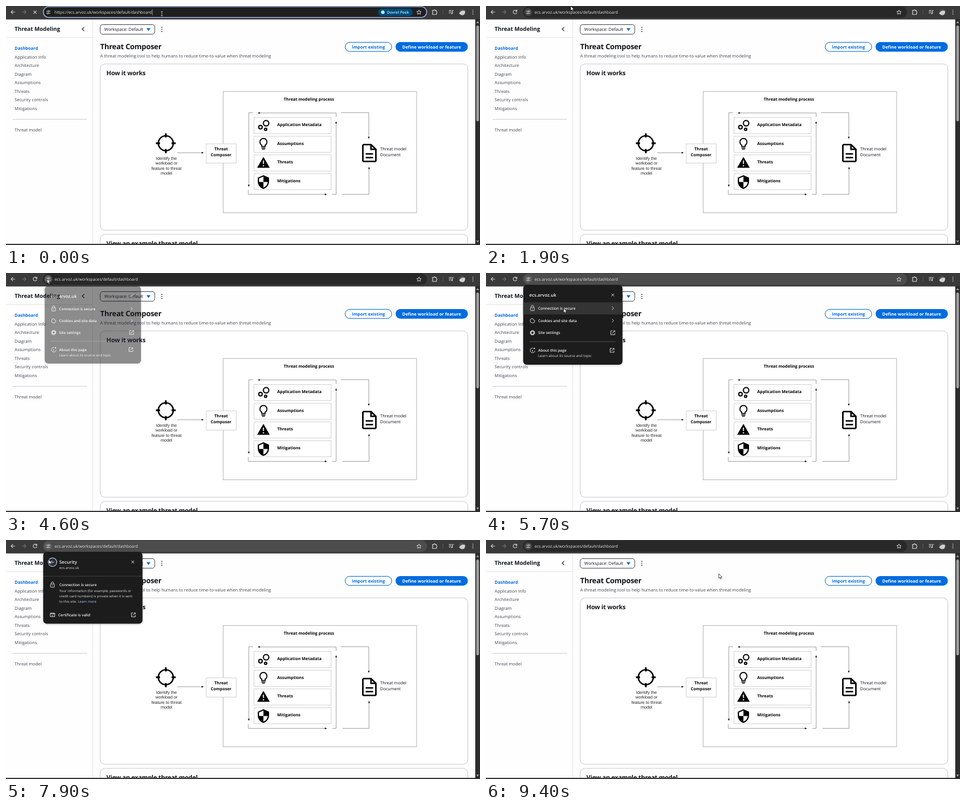
These frames come from a looping animation (800 by 404 pixels, 9500 ms). An HTML page:

```html
<!DOCTYPE html>
<html lang="en">
<head>
<meta charset="utf-8">
<title>Threat Composer</title>
<style>
html, body { margin: 0; width: 100%; height: 100%; overflow: hidden; background: #fff; }
svg { display: block; width: 800px; height: 404px; }
text { font: 7.28px "Open Sans", sans-serif; text-rendering: geometricPrecision; fill: #0f141a; white-space: pre; }
text.h1 { font-size: 12.48px; font-weight: 700; letter-spacing: -.02em; }
text.h2 { font-size: 10.4px; font-weight: 700; letter-spacing: -.015em; }
text.h3 { font-size: 9.38px; font-weight: 700; }
text.soft { fill: #424650; }
text.btn { font-weight: 700; text-anchor: middle; letter-spacing: .005em; }
text.part { font-size: 6.93px; font-weight: 700; fill: #000; }
text.mid { text-anchor: middle; }
text.arial { font: 7.2px "Liberation Sans", sans-serif; fill: #222; text-anchor: middle; }
text.url { font-size: 6.83px; fill: #e3e3e3; }
text.title { font-size: 7.7px; font-weight: 600; fill: #f0f0f0; }
text.row { font-size: 6.34px; font-weight: 600; fill: #f0f0f0; }
text.note { font-size: 5.84px; fill: #dcdcdc; }
.line { fill: none; stroke: #d0d0d0; stroke-width: 1; }
.bar { stroke-width: 1.1; }
.flow { fill: none; stroke: #777; stroke-width: .7; }
.box { fill: #fff; stroke: #c8c8c8; stroke-width: .8; }
.card { fill: #fff; stroke: #c6c6cd; stroke-width: .9; }
.ink { fill: none; stroke: #000; stroke-width: 2; }
</style>
</head>
<body>
<svg viewBox="0 0 800 404">
  <defs>
    <marker id="tip" markerUnits="userSpaceOnUse" markerWidth="5" markerHeight="4" refX="3.5" refY="1.5" orient="auto">
      <path d="M0 0L3.6 1.5L0 3z" fill="#111"/>
    </marker>
    <filter id="shadow" x="-10%" y="-10%" width="120%" height="125%">
      <feDropShadow dx="0" dy="1" stdDeviation="1.5" flood-opacity=".25"/>
    </filter>
    <g id="lock" class="line">
      <rect x="-3.2" y="-1.5" width="6.4" height="5.6" rx=".8"/>
      <path d="M-2-1.5V-3a2 2 0 0 1 4 0v1.5M0 .6v1.4"/>
    </g>
    <path id="open" class="line" d="M-.5-3.3H-3.3V3.3H3.3V.5M.8-3.3H3.3V-.8M3.3-3.3L-1 1"/>
    <path id="close" class="line" d="M-2.2-2.2L2.2 2.2M2.2-2.2L-2.2 2.2"/>
    <path id="next" class="line" d="M-1.3-2.7L1.4 0L-1.3 2.7"/>
  </defs>

  <!-- page -->
  <rect width="800" height="404" fill="#fefefe"/>
  <path d="M146.4 22V402M0 53.5H146" stroke="#dcdfe4" stroke-width=".8"/>
  <text class="h3" x="14.6" y="42.4">Threat Modeling</text>
  <path d="M132 35.8L128.6 39L132 42.2" fill="none" stroke="#333" stroke-width="1.2"/>
  <g id="nav"></g>
  <path d="M11 191.5H137" stroke="#c6c6cd" stroke-width=".8"/>
  <text class="soft" x="14.6" y="211.8">Threat model</text>

  <rect x="159" y="31.5" width="92" height="16.2" rx="4.2" fill="#fff" stroke="#424650"/>
  <text x="165.8" y="42.3">Workspace: Default</text>
  <path d="M237 37.4h7l-3.5 4.8z" fill="#006ce0"/>
  <path d="M263 36.2v.01M263 39.6v.01M263 43v.01" stroke="#333" stroke-width="1.8" stroke-linecap="round"/>
  <text class="h1" x="159" y="73.3">Threat Composer</text>
  <text class="soft" x="159" y="87">A threat modeling tool to help humans to reduce time-to-value when threat modeling</text>
  <rect x="572.4" y="61.4" width="78.6" height="15.4" rx="7.7" fill="#fff" stroke="#006ce0"/>
  <text class="btn" x="611.7" y="71.8" style="fill:#006ce0">Import existing</text>
  <rect x="657.5" y="61" width="122" height="16.2" rx="8.1" fill="#006ce0"/>
  <text class="btn" x="718.5" y="71.8" style="fill:#fff">Define workload or feature</text>
  <rect class="card" x="159" y="98" width="620.5" height="281" rx="8"/>
  <text class="h2" x="169.6" y="117">How it works</text>
  <rect class="card" x="159" y="386" width="620.5" height="40" rx="8"/>
  <text class="h2" x="169.6" y="404.6">View an example threat model</text>

  <!-- diagram -->
  <rect x="366.5" y="144.6" width="326.5" height="204.8" fill="none" stroke="#a6a6a6" stroke-width=".8"/>
  <text class="part mid" x="511.3" y="159.6">Threat modeling process</text>
  <rect class="box" x="338" y="233" width="50.5" height="32.5"/>
  <text class="part mid" x="363" y="244">Threat</text>
  <text class="part mid" x="363" y="253.6">Composer</text>
  <g id="flows"></g>
  <g id="parts"></g>
  <g class="ink" style="stroke-width:2.4">
    <circle cx="269.7" cy="232" r="12.6"/>
    <path d="M269.7 215.3v7M269.7 241.7v7M253 232h7M279.4 232h7" stroke-width="3"/>
  </g>
  <g id="caption"></g>
  <g class="ink">
    <circle cx="429.5" cy="204.8" r="3"/><circle cx="439" cy="198.2" r="4.6"/><circle cx="438.2" cy="208.4" r="1.9"/>
    <path d="M431.6 237.6v-2.4a6 6 0 1 1 5.8 0v2.4z" stroke-width="1.8"/>
    <path d="M431.2 240.2h6.6M432.2 242.4h4.6" stroke-width="1.4"/>
  </g>
  <path d="M434.5 255L445.2 273.6H423.8z"/>
  <path d="M434.5 261.3v5.6M434.5 269v2.2" stroke="#fff" stroke-width="1.8"/>
  <path transform="translate(421.8 284.9) scale(1.055)" fill-rule="evenodd"
    d="M12 1L3 5v6c0 5.6 3.8 10.7 9 12c5.2-1.300 9-6.400 9-12V5zM12 12h7c-.5 4.100-3.300 7.800-7 8.900zM12 12H5V6.300l7-3.100z"/>
  <path class="ink" style="stroke-width:2.6" d="M616 234.300H604a1.700 1.700 0 0 0-1.700 1.700V261a1.700 1.700 0 0 0 1.700 1.700H622.600a1.700 1.700 0 0 0 1.700-1.700V242.300zM616 234.300V242.300H624.300M607 250h12.500M607 256.300h12.500"/>
  <text x="631.5" y="244.3" style="font-size:7.1px">Threat model</text>
  <text x="631.5" y="254" style="font-size:7.1px">Document</text>

  <!-- browser frame -->
  <path d="M0 0H800V404H0V402H792V22.800H0z" fill="#3a3a3a"/>
  <path d="M792 22h8v382h-8z" fill="#2c2c2c"/>
  <rect x="793.6" y="33" width="4.8" height="162" rx="2.4" fill="#9f9f9f"/>
  <path d="M793.600 29l2.400-3.400l2.400 3.400zM793.600 396.600l2.400 3.400l2.400-3.400z" fill="#9f9f9f"/>
  <g class="line bar">
    <path d="M15.200 10.300H8.600M11.700 7.200L8.600 10.300L11.700 13.400"/>
    <path d="M27 10.300h6.600M30.500 7.200l3.100 3.100l-3.100 3.100" stroke="#737373"/>
    <path id="reload" d="M51.400 8.200A3.100 3.100 0 1 0 52.100 10.600M52.200 6.600V8.900H49.900"/>
    <path id="stop" d="M46.500 7.800l5 5M51.500 7.800l-5 5"/>
  </g>
  <rect id="omnibox" x="63" y="1.2" width="647" height="18.2" rx="9.1" stroke-width="1.3"/>
  <circle id="chip" cx="71.3" cy="10.4" r="6.6"/>
  <path class="line" d="M68 8.800h2.600M73 8.800h1.800M68 12.300h1.600M72.200 12.300h2.600"/>
  <g fill="none" stroke="#d5d5d5" stroke-width=".9"><circle cx="71.9" cy="8.8" r="1.1"/><circle cx="70.8" cy="12.3" r="1.1"/></g>
  <rect id="selection" x="81.5" y="5" width="141.7" height="11" fill="#a8c7fa"/>
  <text id="url" class="url" x="82" y="12.9"></text>
  <path id="caret" d="M247 5.500v10" stroke="#e3e3e3" stroke-width=".6"/>
  <g id="lens">
    <rect x="628" y="4.2" width="58.5" height="12.8" rx="6.4" fill="#004a77"/>
    <circle cx="636" cy="10.6" r="3" fill="#c2e7ff"/>
    <text x="643" y="12.9" style="font-size:6.5px;font-weight:600;fill:#c2e7ff">Dovrel Peek</text>
  </g>
  <path class="line" d="M697 6.800l1.100 2.500l2.700 .2l-2 1.800l.6 2.700l-2.400-1.400l-2.400 1.400l.6-2.700l-2-1.800l2.700-.2z"/>
  <path class="line bar" d="M719.800 7.600h2.200a1.200 1.200 0 0 1 2.400 0h2v2.200a1.200 1.200 0 0 1 0 2.400v2h-6.600v-2.200a1.200 1.200 0 0 0 0-2.200z"/>
  <path d="M737.500 6v9" stroke="#5a5a5a" stroke-width=".8"/>
  <path class="line" d="M747.500 7.500h4.800M747.500 9.800h4.800M747.500 12.100h2.600M753.600 12.400V7.400h2"/>
  <circle cx="752.6" cy="12.5" r="1.3" fill="#c7c7c7"/>
  <circle cx="769.7" cy="10.2" r="5.6" fill="#4c4c4c"/>
  <path d="M764.800 12.500q3-6 9.500-4.500q1.500 3-1 6.500q-4.500 2.500-8.500-2z" fill="#d2d0cc"/>
  <path d="M788 7v.01M788 10.200v.01M788 13.400v.01" stroke="#c7c7c7" stroke-width="1.7" stroke-linecap="round"/>

  <!-- site information -->
  <g id="popup">
    <rect id="panel" x="62.8" y="20" width="167.6" rx="6" fill="#1f1f1f" filter="url(#shadow)"/>
    <use href="#close" x="214" y="37.2"/>
    <g id="info">
      <rect id="hover" x="62.8" y="49.6" width="167.6" height="20.4" fill="#343434"/>
      <text class="title" x="73" y="40.2">ecs.arvoz.uk</text>
      <use href="#lock" x="78.3" y="59.5"/>
      <use href="#next" x="214" y="59.5"/>
      <g class="line">
        <path d="M78.500 76.700a3.900 3.900 0 1 0 3.900 3.900a2 2 0 0 1-2-2a2 2 0 0 1-1.900-1.900z"/>
        <circle cx="78.4" cy="101" r="2.8" stroke-width="1.8"/>
        <circle cx="78.4" cy="101" r="4" stroke-width="1" stroke-dasharray="1.8 1.34"/>
        <path d="M79 127a3.900 3.900 0 1 0 3.500 4.500M78.500 130v3M81.500 126v3M80 127.500h3"/>
      </g>
      <use href="#next" x="214" y="80.5"/>
      <use href="#open" x="214" y="101"/>
      <path d="M73 116H219" stroke="#5a5a5a" stroke-width=".8"/>
      <use href="#open" x="212.8" y="130.7"/>
      <g id="rows"></g>
      <text class="note" x="88" y="142.3" style="font-size:6.03px">Learn about its source and topic</text>
    </g>
    <g id="security">
      <circle cx="78.4" cy="37.5" r="7.2" fill="#2b2b2b" stroke="#a8c7fa" stroke-width="1.2"/>
      <path class="line" d="M81.400 37.500h-6M78.200 34.700l-2.800 2.800l2.800 2.800"/>
      <text class="title" x="90" y="39.5">Security</text>
      <text class="note" x="90" y="49.4">ecs.arvoz.uk</text>
      <path d="M63 61.200H230" stroke="#484848" stroke-width=".8"/>
      <use href="#lock" x="78.4" y="75.8"/>
      <text class="row" x="90" y="78">Connection is secure</text>
      <text class="note" x="90" y="87.6">Your information (for example, passwords or</text>
      <text class="note" x="90" y="97">credit card numbers) is private when it is sent</text>
      <text class="note" x="90" y="106.4">to this site. <tspan fill="#a8c7fa">Learn more</tspan></text>
      <path class="line" d="M74.800 123.700h7.400v5.800h-7.400zM74.800 124.700h7.400M77 127l1.200 1.200l2.200-2.200"/>
      <text class="row" x="88" y="128.9">Certificate is valid</text>
      <use href="#open" x="215" y="126.5"/>
    </g>
  </g>

  <path id="arrow" d="M0 0V7.800L1.800 6.200L3 9L4.300 8.400L3.100 5.700H5.500z" fill="#fff" stroke="#111" stroke-width=".7"/>
  <path id="beam" d="M-1.500-3.500H1.500M0-3.500V3.500M-1.500 3.500H1.500" stroke="#d0d0d0" stroke-width=".8" fill="none"/>
</svg>
<script>
const $ = id => document.getElementById(id);
const show = (id, on) => $(id).style.display = on ? "" : "none";
const label = (x, y, text, kind, style = "") =>
  `<text class="${kind}" x="${x}" y="${y}" style="${style}">${text}</text>`;

$("nav").innerHTML = ["Dashboard", "Application Info", "Architecture", "Diagram", "Assumptions",
  "Threats", "Security controls", "Mitigations"].map((name, i) =>
  label(14.6, 74 + 14.57 * i, name, "soft", i ? "" : "fill:#006ce0;font-weight:700")).join("");

$("parts").innerHTML = ["Application Metadata", "Assumptions", "Threats", "Mitigations"].map((name, i) =>
  `<rect class="box" x="418.7" y="${188.4 + 31.7 * i}" width="130" height="27.2"/>` +
  label(457.8, 202.8 + 31.8 * i, name, "part")).join("");

$("flows").innerHTML = ["M289 248H333.5", "M417 180.3H409.8V305.5", "M557.2 187.5V180.8H425",
  "M550.5 318.4H557.2V195", "M409 311V318.4H541.5", "M565 180.3H612.3V224.5", "M568 318.4H612.7V272"]
  .map(d => `<path class="flow" d="${d}" marker-end="url(#tip)"/>`).join("");

$("caption").innerHTML = ["Identify the", "workload or", "feature to threat", "model"]
  .map((line, i) => label(270.8, 259.6 + 8.5 * i, line, "arial")).join("");

$("rows").innerHTML = [["Connection is secure", 62], ["Cookies and site data", 82.8],
  ["Site settings", 103.3], ["About this page", 133]].map(([s, y]) => label(88, y, s, "row")).join("");

const LOOP = 9500, STEP = 100;
const LOADED = 700, SELECT = 2400, OPEN = 4500, LEAVE = 5100, DETAIL = 6200, BACK = 8300, SHUT = 8800;
const address = "ecs.arvoz.uk/workspaces/default/dashboard";

// time, x, y of the pointer
const path = [[0, 263, 13], [900, 263, 13], [1800, 143, 0], [2000, 143, 0], [2400, 170, 10], [2700, 170, 10],
  [3300, 121, 15], [4200, 69.5, 10], [4700, 69.5, 10], [5500, 131, 59.5], [6400, 131, 59.5],
  [7800, 72, 33], [8300, 72, 33], [9300, 393, 57], [9500, 393, 57]];

function pointer(t) {
  const i = path.findIndex(p => p[0] > t);
  const [t0, x0, y0] = path[i - 1], [t1, x1, y1] = path[i];
  const u = (t - t0) / (t1 - t0), k = u * u * (3 - 2 * u);
  return [x0 + (x1 - x0) * k, y0 + (y1 - y0) * k];
}

function draw(now) {
  const t = Math.floor(now % LOOP / STEP) * STEP;
  const loading = t < LOADED, selected = t >= SELECT && t < 4300, focused = loading || selected;
  const open = t > OPEN && t < SHUT, detail = t >= DETAIL && t < BACK;
  const lit = t >= LEAVE && t < SHUT;
  const [x, y] = pointer(t);

  show("stop", loading);
  show("reload", !loading);
  show("caret", loading);
  show("lens", focused);
  show("selection", selected);
  const fill = focused ? "#1f1f1f" : lit ? "#4c4c4c" : "#282828";
  $("omnibox").setAttribute("fill", fill);
  $("omnibox").setAttribute("stroke", focused ? "#a8c7fa" : fill);
  $("chip").setAttribute("fill", focused ? "none" : t >= 4300 && t < SHUT ? "#5c5c5c" : "#444");
  $("url").textContent = (loading ? "https://" : "") + address;
  $("url").style.fill = selected ? "#1f1f1f" : "";

  show("popup", open);
  show("info", !detail);
  show("security", detail);
  show("hover", x > 63 && y > 50 && y < 70);
  $("panel").setAttribute("height", detail ? 121.5 : 135);
  const p = Math.max(0, Math.min(1, (t - OPEN) / 200)), scale = .94 + .06 * p;
  $("popup").setAttribute("opacity", p);
  $("popup").setAttribute("transform", `translate(146.6 87.5) scale(${scale}) translate(-146.6 -87.5)`);

  const beam = t < 1200 || t >= 2300 && t < 2900;
  show("beam", beam);
  show("arrow", !beam);
  $(beam ? "beam" : "arrow").setAttribute("transform", `translate(${x} ${y})`);
}

const start = performance.now();
(function tick() {
  draw(performance.now() - start);
  requestAnimationFrame(tick);
})();
</script>
</body>
</html>
```
